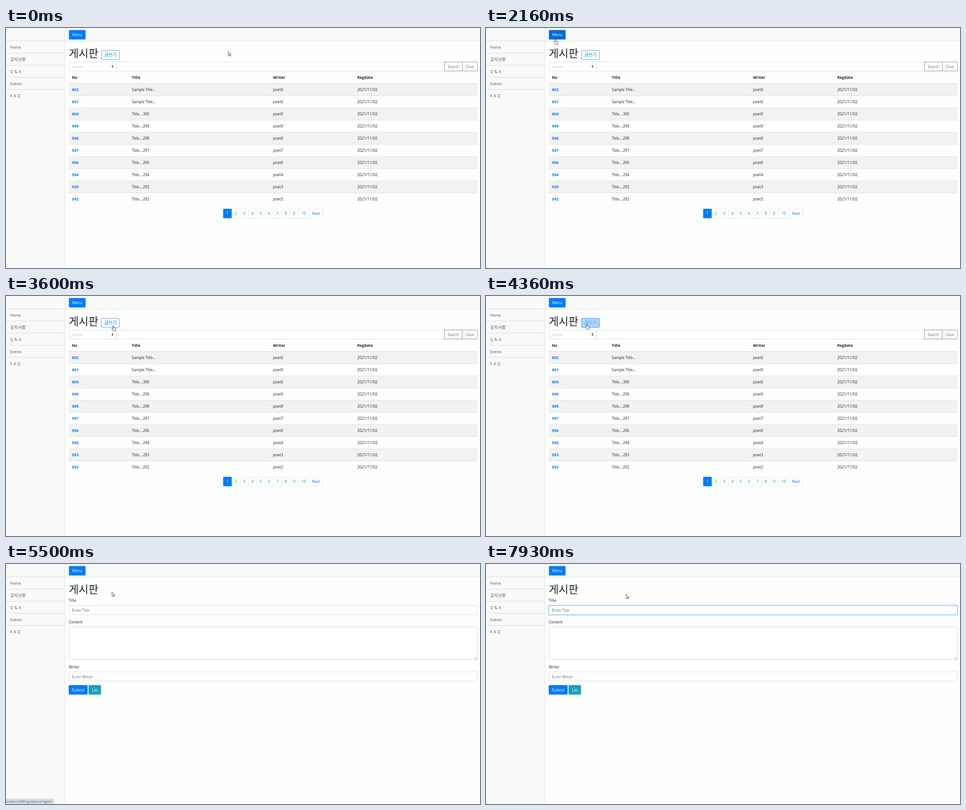
An HTML page that plays this animation: 1051 by 533 pixels, repeating every 8 s.

```html
<!DOCTYPE html>
<html lang="ko">
<head>
<meta charset="utf-8">
<title>게시판</title>
<style>
  html, body { margin: 0; width: 100%; height: 100%; overflow: hidden; background: #fefefe; }
  svg { display: block; width: 100vw; height: 100vh; }
  text { font-family: "Open Sans", "Noto Sans CJK KR", "Noto Sans CJK", sans-serif; white-space: pre; }
</style>
</head>
<body>
<svg id="stage" viewBox="0 0 1051 533" preserveAspectRatio="none"></svg>
<script>
const LOOP = 8000, ROW = 27, LEFT = 139, WIDE = 906.5;
const BLUE = [0, 123, 255], DARK_BLUE = [0, 105, 217], WHITE = [255, 255, 255];
const INK = '#212529', MUTED = '#6c757d', LINE = '#dee2e6', EDGE = '#ced4da', LINK = '#007bff', BAR = '#f8faf9';

const attrs = o => Object.entries(o).map(([k, v]) => ` ${k}="${v}"`).join('');
const rect = (x, y, width, height, fill, extra = {}) =>
  `<rect${attrs({ x, y, width, height, fill, ...extra })}/>`;
const box = (x, y, w, h, stroke, extra = {}) =>
  rect(x + .5, y + .5, w - 1, h - 1, '#fff', { stroke, 'stroke-width': .8, rx: 2, ...extra });
const text = (x, y, s, size = 8.3, fill = INK, extra = {}) =>
  `<text${attrs({ x, y, 'font-size': size, fill, ...extra })}>${s}</text>`;
const mid = { 'text-anchor': 'middle' }, bold = { 'font-weight': 700 };
const button = (x, y, w, label, fill, extra = {}) =>
  rect(x, y, w, 21, fill, { rx: 2, ...extra }) + text(x + w / 2, y + 13.7, label, 8.3, '#fff', mid);

function frameParts() {
  const items = ['Home', '공지사항', 'Q &amp; A', 'Events', 'F A Q'];
  const item = (s, i) => rect(0, 28 + ROW * i, 130, 1, '#dadcdd') +
    text(9.3, 45.6 + ROW * i, s, s > '가' ? 9.4 : 8.3, '#54595e', { 'word-spacing': 1 });
  return rect(0, 0, 130, 533, BAR) + rect(130, 0, 1, 533, LINE) +
    rect(131, 0, 920, 29, BAR) + rect(131, 29, 920, 1, LINE) +
    items.map(item).join('') +
    button(139.5, 4.5, 37, 'Menu', LINK, { id: 'menu' }) +
    text(139.3, 65.2, '게시판', 23.7, INK, { 'font-weight': 300 });
}

function listRow(_, i) {
  const no = 602 - i - (i > 6), sample = no > 600;
  const y = 123.5 + ROW * i, base = y + 16.6;
  return (i % 2 ? '' : rect(LEFT, y, WIDE, ROW, '#f2f2f2')) +
    rect(LEFT, y - .5, WIDE, 1, LINE) +
    text(146, base, no, 8.7, LINK, bold) +
    text(279, base, sample ? 'Sample Title...' : 'Title....' + (no - 300), 8.15) +
    text(592, base, 'poet' + (sample ? 0 : no % 10)) +
    text(779, base, '2021/11/02', 8.45);
}

function pager() {
  const x0 = 481.5, step = 18.5;
  const cell = (_, i) => {
    const w = i === 9 ? 23.5 : i === 10 ? 32 : step, x = i === 10 ? 671 : x0 + step * i;
    return (i > 1 ? rect(x, 402, .8, 20, LINE) : '') +
      text(x + w / 2 + .2, 415.2, i === 10 ? 'Next' : i + 1, 8.3, i ? LINK : '#fff', mid);
  };
  return box(x0, 401.5, 221.5, 21, LINE) +
    `<path d="M500.500 401.500h-17a2 2 0 0 0-2 2v17a2 2 0 0 0 2 2h17z" fill="${LINK}"/>` +
    Array.from({ length: 11 }, cell).join('');
}

function listPage() {
  const head = (x, s) => text(x, 113.1, s, 8.45, INK, bold);
  return '<g id="list">' +
    rect(209.6, 47.9, 43.8, 24.1, LINK, { rx: 3.4, id: 'ring', opacity: 0 }) +
    rect(211.5, 49.5, 40, 20.5, '#fff', { rx: 2, stroke: LINK, 'stroke-width': .7, id: 'write' }) +
    text(231.5, 63.4, '글쓰기', 9.7, LINK, { ...mid, id: 'writeText', 'font-weight': 300 }) +
    box(LEFT, 75, 107, 21, EDGE) + box(245, 75, 728, 21, EDGE, { rx: 0 }) +
    text(146, 88.6, '-------', 8.3, '#495057', { 'letter-spacing': .9 }) +
    '<path d="M234 84.800l2.200-2.600 2.200 2.600zM234 86l2.200 2.600 2.200-2.600z" fill="#343a40"/>' +
    box(972, 75, 40, 21, MUTED, { rx: 0 }) + box(1011, 75, 34.8, 21, MUTED) +
    text(992, 88.7, 'Search', 8.2, MUTED, mid) + text(1028.5, 88.7, 'Clear', 8.2, MUTED, mid) +
    head(146, 'No') + head(279, 'Title') + head(592, 'Writer') + head(779, 'Regdate') +
    Array.from({ length: 10 }, listRow).join('') +
    rect(LEFT, 122.6, WIDE, 1.2, LINE) + pager() + '</g>';
}

function formPage() {
  return '<g id="form">' +
    text(LEFT, 84.2, 'Title') + text(LEFT, 131.6, 'Content') + text(LEFT, 231.8, 'Writer') +
    rect(137.4, 90.4, 909.7, 24.1, '#bfdeff', { rx: 3.4, id: 'focus' }) +
    box(LEFT, 92, WIDE, 21, EDGE, { id: 'field' }) + text(146, 106.2, 'Enter Title', 8.25, MUTED) +
    rect(146, 97.5, .9, 11, '#222', { id: 'caret' }) +
    box(LEFT, 139, WIDE, 74, EDGE) +
    '<path d="M1039.500 211.500l4.500-4.500M1042 211.500l2-2" stroke="#777" stroke-width=".8"/>' +
    box(LEFT, 239, WIDE, 21.5, EDGE) + text(146, 253.8, 'Enter Writer', 8.25, MUTED) +
    button(LEFT, 269, 42, 'Submit', LINK) + button(183, 269, 27.7, 'List', '#17a2b8') + '</g>';
}

function overlays() {
  const skin = 'fill="#fff" stroke="#222" stroke-width=".8" stroke-linejoin="round"';
  return '<g id="status">' +
    '<path d="M0 521.500h105a2 2 0 0 1 2 2v9.500h-107z" fill="#dee1e6" stroke="#c6c9ce" stroke-width=".8"/>' +
    text(1, 529.6, 'localhost:8080/guestbook/register', 6.4, '#50545a') + '</g>' +
    '<g id="cursor"><circle id="click" cy=".5" r="5.6" fill="#f7f04e" opacity=".9"/>' +
    `<path id="arrow" d="M0 0v9.300l2.100-1.900 1.500 3.300 1.500-.7-1.500-3.200h2.800z" ${skin}/>` +
    `<path id="hand" d="M-1 .8a1 1 0 0 1 2 0v3.400l3.200.7q1.500.4 1.300 2l-.7 4.500h-4.800l-2.800-4.100q-.5-1.300.7-1.400l1.100.9z" ${skin}/>` +
    '<path id="beam" d="M-1.700-4.500q1.700 0 1.700 1v7q0 1-1.700 1M1.700-4.500q-1.700 0-1.700 1M0 3.500q0 1 1.700 1" fill="none" stroke="#333" stroke-width=".9"/></g>';
}

const stage = document.getElementById('stage');
stage.innerHTML = frameParts() + listPage() + formPage() + overlays();
const el = {};
stage.querySelectorAll('[id]').forEach(n => el[n.id] = n);

// pointer key points: time, x, y
const keys = [
  [850, 492.8, 52], [1529, 222.5, 57.5], [1680, 193, 62], [2040, 157, 21], [2147, 154, 25.3],
  [2520, 148, 121], [2800, 178, 147], [3340, 283, 130], [3591, 238, 66.3], [3920, 168, 64],
  [4500, 235, 62.3], [5480, 235, 62.3], [6110, 192.3, 103.5], [6341, 192.3, 103.5], [6860, 310.8, 67]
];

const clamp = (v, lo = 0, hi = 1) => Math.min(hi, Math.max(lo, v));
const ease = v => { v = clamp(v); return v * v * (3 - 2 * v); };
const hover = (t, enter, leave = LOOP) => ease((t - enter) / 150) - ease((t - leave) / 150);
const mix = (a, b, p) => `rgb(${a.map((v, i) => Math.round(v + (b[i] - v) * p))})`;
const show = (n, on) => n.setAttribute('visibility', on ? 'inherit' : 'hidden');
const within = ([x, y], l, t, r, b) => x >= l && x <= r && y >= t && y <= b;

const speed = (i, k) => (keys[i + 1][k] - keys[i][k]) / (keys[i + 1][0] - keys[i][0]);

// smooth through the points, at rest where the direction turns
function slope(i, k) {
  if (i === 0 || i === keys.length - 1) return 0;
  const a = speed(i - 1, k), b = speed(i, k);
  return a * b > 0 ? 2 * a * b / (a + b) : 0;
}

function pointerAt(time) {
  const t = clamp(time, keys[0][0], keys[keys.length - 1][0]);
  const i = Math.max(1, keys.findIndex(p => p[0] >= t)) - 1;
  const d = keys[i + 1][0] - keys[i][0], u = (t - keys[i][0]) / d, v = 1 - u;
  return [1, 2].map(k => keys[i][k] + (keys[i + 1][k] - keys[i][k]) * ease(u) +
    d * u * v * (v * slope(i, k) - u * slope(i + 1, k)));
}

function draw(time) {
  const t = time < 895 ? 0 : 910 + Math.floor((time - 895) / 68.75) * 68.75;
  const form = t >= 5230, pos = pointerAt(t);
  show(el.list, !form);
  show(el.form, form);

  const p = hover(t, 1420, 1610) + hover(t, 3575, 3790) + hover(t, 4290);
  el.write.setAttribute('fill', mix(WHITE, BLUE, p));
  el.writeText.setAttribute('fill', mix(BLUE, WHITE, p));
  el.ring.setAttribute('opacity', .5 * ease((t - 4880) / 150));
  el.menu.setAttribute('fill', mix(BLUE, DARK_BLUE, hover(t, 1960, 2160)));

  const focus = ease((t - 6315) / 150);
  el.focus.setAttribute('opacity', focus);
  el.field.setAttribute('stroke', mix([206, 212, 218], [128, 189, 255], focus));
  show(el.caret, form && t >= 6330 && Math.floor((t - 6330) / 530) % 2 === 0);
  show(el.status, t >= 4560 && t < 5720);

  const hand = within(pos, 139, 4, 177, 26) || (t < 5100 && within(pos, 211, 49, 252, 71));
  const beam = form ? within(pos, 139, 92, 1046, 113) : within(pos, 139, 45, 204, 69);
  show(el.hand, hand);
  show(el.beam, beam && !hand);
  show(el.arrow, !hand && !beam);
  show(el.click, (t >= 4870 && t < 4960) || (t >= 6330 && t < 6400));
  el.cursor.setAttribute('transform', `translate(${pos})`);
}

const start = performance.now();
function tick() {
  draw((performance.now() - start) % LOOP);
  requestAnimationFrame(tick);
}
tick();
</script>
</body>
</html>
```
